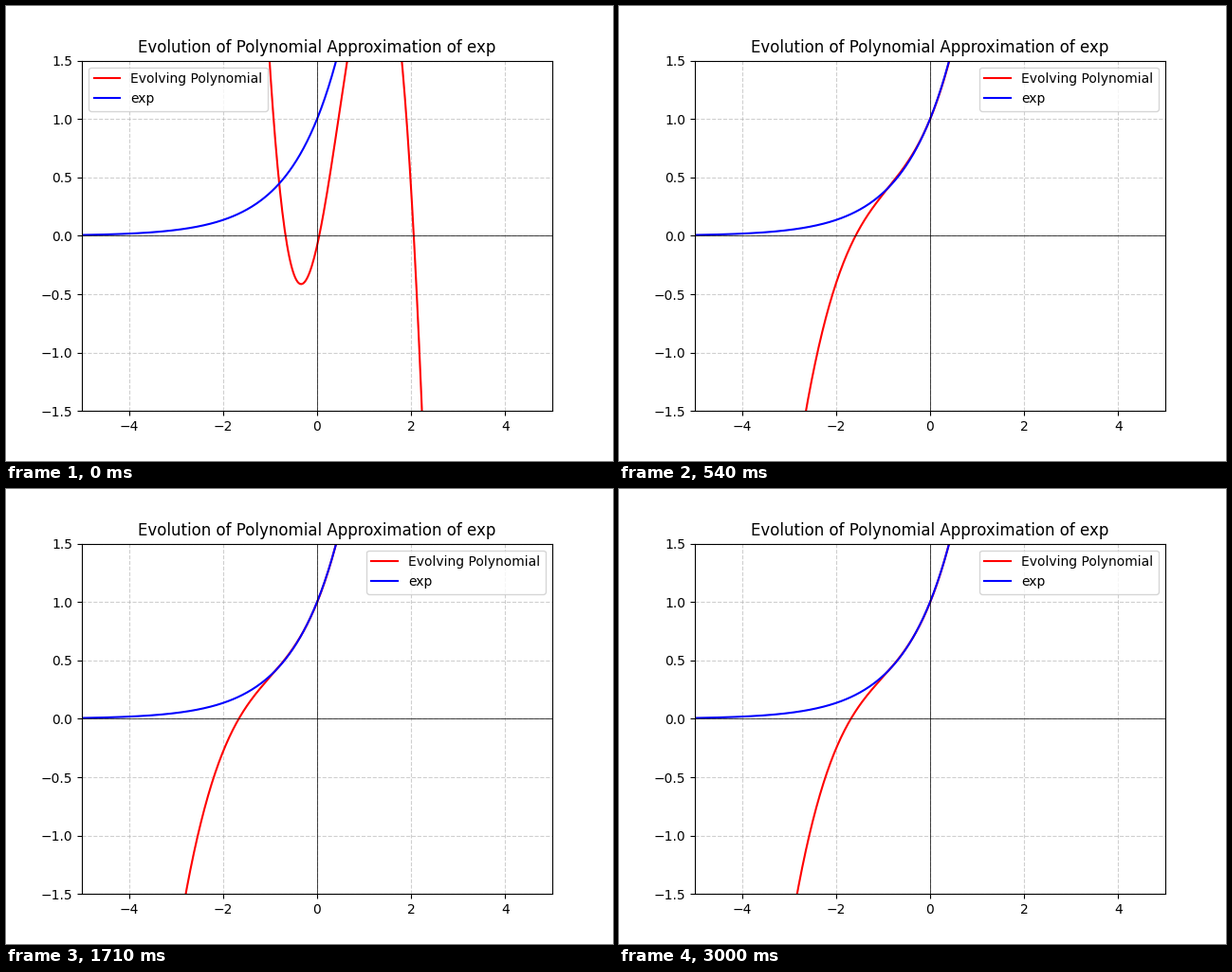
A matplotlib script that plays this animation: 640 by 480 pixels, repeating every 3.06 s.

```python
import matplotlib.pyplot as plt
import numpy as np
from matplotlib.animation import FuncAnimation
from numpy.polynomial.polynomial import polyval

FRAMES, INTERVAL = 102, 30
ROUGH_END = 12       # frame at which the fast first search ends
OVERSHOOT_AT = 62    # frame of the short overshoot

# Cubic coefficients, lowest power first
START = -1.36 * np.poly([-0.67, 0.045, 2.055])[::-1]
ROUGH = np.array([1.0, 0.955, 0.518, 0.2095])
BEST = np.array([0.9963, 0.9980, 0.5367, 0.1761])  # least squares on [-1, 1]

# The better the fit, the more often no improvement is found
rng = np.random.default_rng(4)
stalled = rng.random(FRAMES) < 0.0075 * np.arange(FRAMES)


def coefficients(frame):
    while stalled[frame]:
        frame -= 1
    if frame < ROUGH_END:
        u = np.expm1(-frame / 2) / np.expm1(-ROUGH_END / 2)
        return START + u * (ROUGH - START)
    n = frame - ROUGH_END
    s = 0.84 * (1 - np.exp(-n / 9)) + 0.0021 * n
    s += 0.27 * np.exp(-((frame - OVERSHOOT_AT) / 2) ** 2)
    return ROUGH + s * (BEST - ROUGH)


x = np.linspace(-5, 5, 400)
fig, ax = plt.subplots(figsize=(6.4, 4.8), dpi=100)
poly_line, = ax.plot(x, polyval(x, START), color="red",
                     label="Evolving Polynomial")
ax.plot(x, np.exp(x), color="blue", label="exp")
ax.set(xlim=(-5, 5), ylim=(-1.5, 1.5))
ax.set_title("Evolution of Polynomial Approximation of exp")
ax.axhline(0, color="black", linewidth=0.5)
ax.axvline(0, color="black", linewidth=0.5)
ax.grid(True, linestyle="--", alpha=0.6)
ax.legend(loc="best")


def update(frame):
    poly_line.set_ydata(polyval(x, coefficients(frame)))
    return poly_line,


anim = FuncAnimation(fig, update, frames=FRAMES, interval=INTERVAL,
                     repeat=True, repeat_delay=0, blit=False)
plt.show()
```
